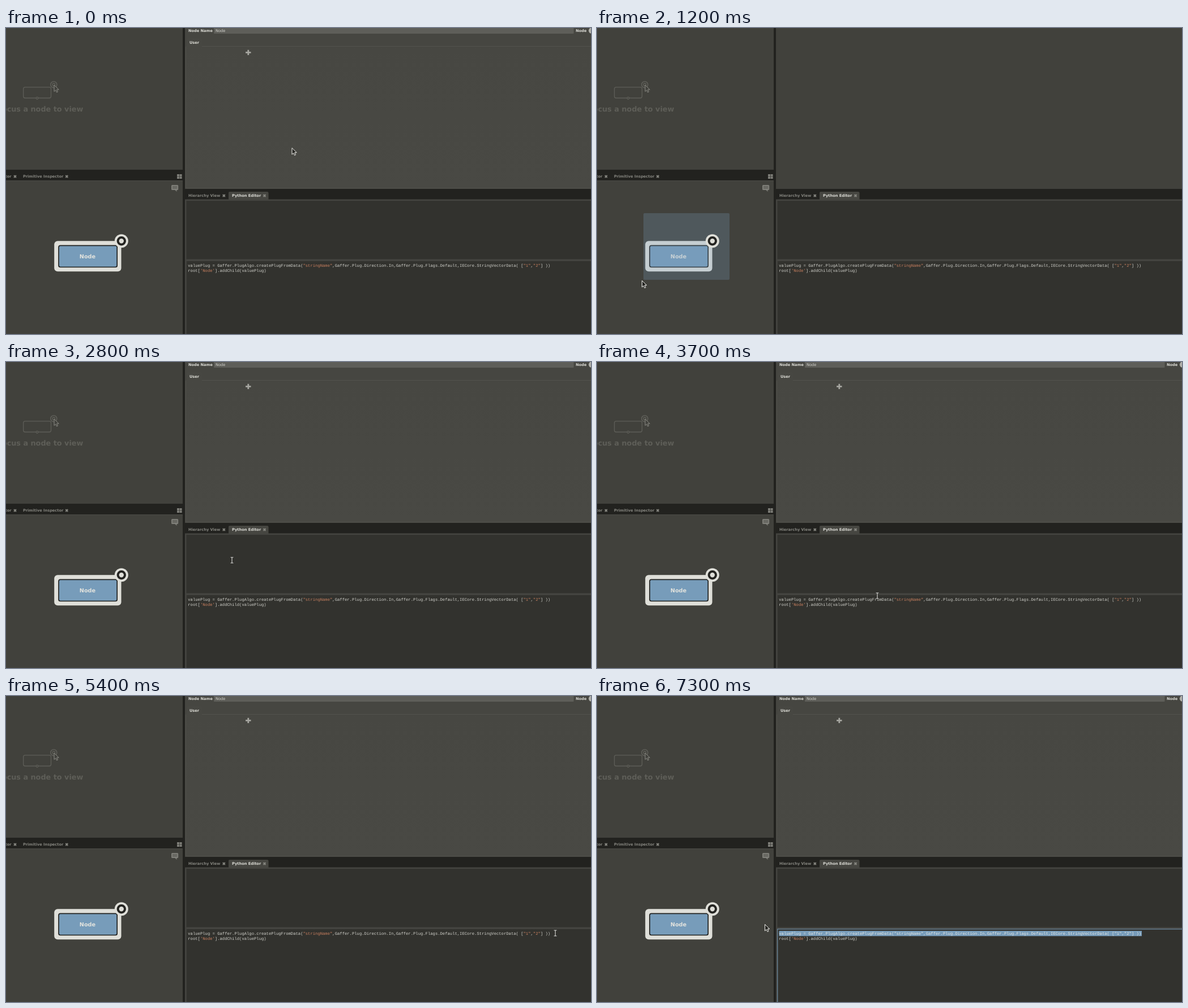
An HTML page that plays this animation: 1033x542 px, repeating every 8000 ms.

```html
<!DOCTYPE html>
<html lang="en">
<head>
<meta charset="utf-8">
<title>Node graph and script editor</title>
<style>
  html, body { margin: 0; width: 100%; height: 100%; overflow: hidden; background: #22221f; }
  svg { display: block; width: 100%; height: 100%; }
  text { font: bold 6.62px "DejaVu Sans", sans-serif; text-rendering: geometricPrecision; }
  .tab { fill: #85857f; }
  .bright { fill: #dcdcd6; }
  .code { font: 7.21px "Liberation Mono", monospace; fill: #d2d2cc; }
  .string { fill: #ca8060; }
  #selection .code, #selection .string { fill: #e6e8e4; }
  .hint { fill: none; stroke: #5e5e58; stroke-width: 1.3; }
</style>
</head>
<body>
<svg viewBox="0 0 1033 542">
  <defs>
    <linearGradient id="panelShade" x2="0" y2="1">
      <stop stop-color="#474742"/><stop offset="1" stop-color="#494944"/>
    </linearGradient>
    <path id="close" d="M-2-2 2 2M2-2-2 2" stroke="#85857f" stroke-width="1.8"/>
    <path id="pointer" d="M.5.5V12L3.2 9.5 5 13.500 7 12.6 5.2 8.7H8.8Z"/>
    <path id="beamShape" d="M-2.500-5H2.500M0-5V5M-2.500 5H2.500"/>
    <clipPath id="selectionClip"><rect id="selectionArea" y="416" height="9.5"/></clipPath>
  </defs>

  <rect width="1033" height="542" fill="#22221f"/>

  <!-- Viewer -->
  <rect width="312" height="251" fill="#41413c"/>
  <g class="hint">
    <rect x="30.7" y="104.8" width="48.8" height="19.2" rx="3"/>
    <circle cx="55" cy="124.2" r="1.8" fill="#41413c"/>
    <circle cx="84.3" cy="100.2" r="5.5" stroke-width="1.6"/>
    <circle cx="84.3" cy="100.2" r="2.2"/>
  </g>
  <use href="#pointer" x="84.5" y="100.5" fill="#41413c" stroke="#8b8b85"/>
  <text x="136.3" y="148.3" text-anchor="end" style="font-size:12.8px" fill="#5e5e58">Focus a node to view</text>

  <!-- Graph editor -->
  <text class="tab" x="9.5" y="265.2" text-anchor="end">Inspector</text>
  <use href="#close" x="16" y="263"/>
  <text class="tab" x="30" y="265.2">Primitive Inspector</text>
  <use href="#close" x="107.3" y="263"/>
  <path d="M302 259h4v3.7h-4zM306.6 259h4v3.7h-4zM302 263.3h4v3.7h-4zM306.6 263.3h4v3.7h-4z" fill="#7f7f79"/>
  <rect y="270" width="312" height="272" fill="#41413c"/>
  <path d="M0 270.5H312" stroke="#4b4b46"/>
  <path d="M293.5 278h9.2q1.5 0 1.5 1.5v6q0 1.5-1.5 1.5h-1.2v3l-3.2-3h-4.8q-1.5 0-1.5-1.5v-6q0-1.5 1.5-1.5z" fill="#7d7d77"/>
  <path d="M294 281h8.2M294 283.5h8.2" stroke="#4a4a45"/>
  <rect x="85.2" y="377.3" width="118.3" height="53.900" rx="6" fill="#dfdfd9"/>
  <rect id="nodeBody" x="93" y="385.300" width="103.200" height="38.200" rx="3" stroke="#20211f" stroke-width="1.7"/>
  <text x="144" y="407.7" text-anchor="middle" style="font-size:9.7px" fill="#e4e4de">Node</text>
  <rect id="marquee" y="328" rx="2" fill="#779cbd" opacity=".25"/>
  <circle cx="203.8" cy="377.3" r="12" fill="#dfdfd9"/>
  <circle cx="203.8" cy="377.3" r="6.2" fill="#dfdfd9" stroke="#242421" stroke-width="4"/>

  <!-- Node editor -->
  <rect x="316" width="717" height="285" fill="#41413c"/>
  <g id="nodeEditor">
    <rect x="316" width="717" height="285" fill="#464641"/>
    <text class="bright" x="322" y="6.6">Node Name</text>
    <rect x="367" y="-4" width="635.5" height="14" rx="1" fill="#5e5e59"/>
    <text x="370" y="7.3" style="font-weight:400" fill="#d6d6d0">Node</text>
    <text class="bright" x="1006" y="6.6">Node</text>
    <circle cx="1034" cy="4.6" r="5.2" fill="#b0b0aa"/>
    <rect x="318" y="32" width="715" height="251" fill="url(#panelShade)"/>
    <path d="M346 32.5H1033" stroke="#52524d"/>
    <path d="M319.5 33V20q0-2 2-2H344q2 0 2 2V33z" fill="#474742"/>
    <path d="M317.5 33V283.5H1033" fill="none" stroke="#50504b"/>
    <text class="bright" x="324" y="27.7">User</text>
    <path d="M427.8 38.7v9.4M423.1 43.4h9.4" stroke="#a5a59f" stroke-width="2.8"/>
  </g>

  <!-- Python editor -->
  <text class="tab" x="322" y="299.2">Hierarchy View</text>
  <use href="#close" x="384.8" y="297"/>
  <path d="M393 304V292q0-2 2-2H461q2.500 0 2.500 2V304z" fill="#464641"/>
  <text class="bright" x="399" y="299.2">Python Editor</text>
  <use href="#close" x="456.5" y="297"/>
  <rect x="316" y="303.500" width="717" height="239" fill="#444440"/>
  <rect x="318.5" y="306" width="720" height="103.500" fill="#32322e"/>
  <rect id="splitter" x="319" y="409.5" width="714" height="2" fill="#779cbd"/>
  <rect id="input" x="318.8" y="412.9" width="720" height="140" fill="#32322e"/>
  <text id="firstLine" class="code" x="321.3" y="423.1">valuePlug = Gaffer.PlugAlgo.createPlugFromData(<tspan class="string">"stringName"</tspan>,Gaffer.Plug.Direction.In,Gaffer.Plug.Flags.Default,IECore.StringVectorData( [<tspan class="string">"1"</tspan>,<tspan class="string">"2"</tspan>] ))</text>
  <text class="code" x="321.3" y="432.2">root[<tspan class="string">'Node'</tspan>].addChild(valuePlug)</text>
  <g id="selection" clip-path="url(#selectionClip)">
    <rect x="321" y="416" width="642" height="9.5" fill="#779cba"/>
    <text id="selectedLine" class="code" x="321.3" y="423.1"></text>
  </g>

  <use id="arrow" href="#pointer" fill="#242421" stroke="#f0f0ec"/>
  <g id="beam" fill="none">
    <use href="#beamShape" stroke="#1c1c1a" stroke-width="2.6"/>
    <use href="#beamShape" stroke="#f0f0ec" stroke-width="1.1"/>
  </g>
</svg>
<script>
const LOOP = 8000, STEP = 100;
const TEXT_LEFT = 321.5, TEXT_RIGHT = 962, CHAR_WIDTH = 4.327;
const PLUS = { x: 422, y: 64, rx: 50, ry: 40 };

const byId = id => document.getElementById(id);
const show = (id, on) => byId(id).setAttribute("visibility", on ? "visible" : "hidden");
const set = (id, attrs) => {
  for (const name in attrs) byId(id).setAttribute(name, attrs[name]);
};
byId("selectedLine").innerHTML = byId("firstLine").innerHTML;

const smooth = k => k * k * (3 - 2 * k);
const settle = k => 1 - (1 - k) ** 4;
const hesitate = k => k ** 4;

// Each gesture eases from wherever the previous one ended; gaps are pauses.
const gesture = (start, end, x, y, ease = smooth) => ({ start, end, x, y, ease });
const gestures = [
  gesture(100, 900, 235, 329),              // into the graph
  gesture(900, 1200, 79, 447, settle),      // marquee around the node
  gesture(1500, 1900, 401, 223),
  gesture(2000, 2400, PLUS.x, PLUS.y + PLUS.ry),
  gesture(2500, 2800, 399, 351),            // down to the script
  gesture(2900, 3300, 389, 420),
  gesture(3400, 3700, 495, 414),
  gesture(3800, 4700, 702, 419),
  gesture(4700, 4900, 825, 409),
  gesture(4900, 5100, 970, 420),
  gesture(5500, 6400, 425, 407, hesitate),  // select the line backwards
  gesture(6600, 7000, 310, 416),
  gesture(7200, 7300, 296, 404)
];

function pointerAt(t) {
  // One turn around the plus button, starting on its left.
  if (t > 2000 && t <= 2400) {
    const angle = Math.PI * (1 + (t - 2100) / 200);
    return [PLUS.x + PLUS.rx * Math.cos(angle), PLUS.y + PLUS.ry * Math.sin(angle)];
  }
  let x = 504.5, y = 212;
  for (const g of gestures) {
    if (t <= g.start) break;
    const k = g.ease(Math.min(1, (t - g.start) / (g.end - g.start)));
    x += (g.x - x) * k;
    y += (g.y - y) * k;
  }
  return [x, y];
}

function draw(now) {
  const t = Math.floor(now % LOOP / STEP) * STEP;
  const within = (from, to) => t >= from && t < to;
  const [x, y] = pointerAt(t);

  const overText = within(2800, 7300);
  show("arrow", !overText);
  show("beam", overText);
  set(overText ? "beam" : "arrow", { transform: `translate(${x} ${y})` });

  show("nodeEditor", !within(800, 1600));
  set("nodeBody", { fill: within(800, 1100) ? "#32322d" : "#779cba" });

  const dragging = within(1000, 1400);
  show("marquee", dragging);
  if (dragging) set("marquee", { x: x + 3, width: 231 - x, height: y - 329 });

  show("splitter", within(4900, 5000));
  const focused = t >= 5500;
  set("input", { stroke: focused ? "#779cba" : "none" });

  const column = t >= 6400 ? 0 : Math.round((Math.min(x, TEXT_RIGHT) - TEXT_LEFT) / CHAR_WIDTH);
  const left = TEXT_LEFT + column * CHAR_WIDTH;
  show("selection", focused);
  set("selectionArea", { x: left, width: Math.max(0, TEXT_RIGHT - left) });
}

const start = performance.now();
function tick() {
  draw(performance.now() - start);
  requestAnimationFrame(tick);
}
tick();
</script>
</body>
</html>
```
